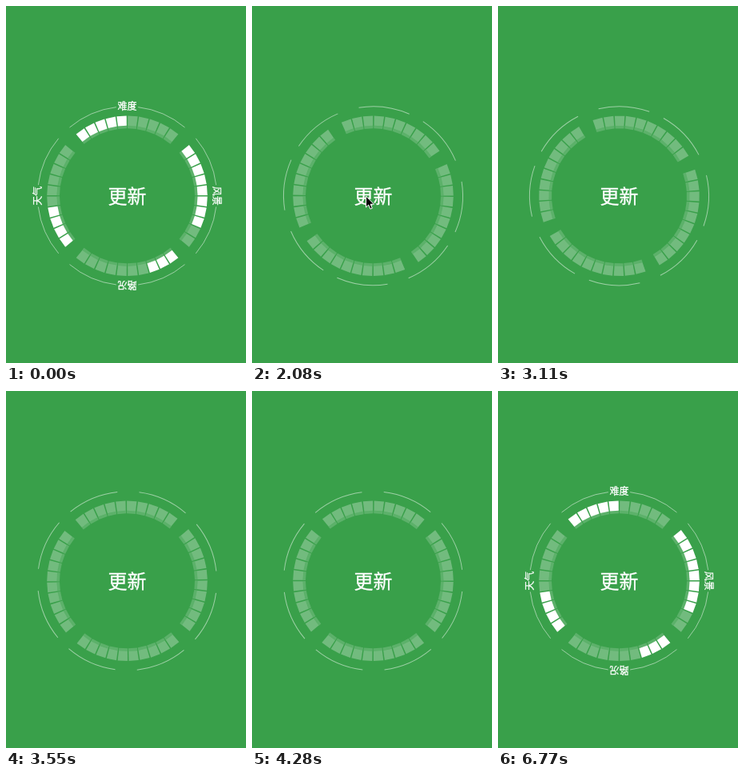
These frames come from a looping animation (300 by 447 pixels, 7890 ms). An HTML page:

```html
<!DOCTYPE html>
<html lang="zh-CN">
<head>
<meta charset="utf-8">
<title>更新</title>
<style>
  html, body { margin: 0; width: 100%; height: 100%; overflow: hidden; background: #39a04a; }
  svg { display: block; width: 300px; height: 447px; }
  text {
    fill: #fff; stroke: #fff; stroke-width: .3; text-anchor: middle;
    font-family: "Noto Sans CJK SC", "Noto Sans CJK", sans-serif;
  }
  .label { font-size: 12px; }
  .title { font-size: 24px; }
  .arc { fill: none; stroke: #fff; stroke-opacity: .5; }
  .cell { fill: #fff; fill-opacity: .29; }
  .cell.on { fill-opacity: 1; }
  .band { fill: #fff; fill-opacity: .18; }
</style>
</head>
<body>
<svg viewBox="0 0 300 447">
  <g transform="translate(151.5 237.8)">
    <g id="arcs"></g>
    <g id="cells"></g>
    <g id="labels"></g>
    <text class="title" y="9">更新</text>
  </g>
  <path id="cursor" d="M0 0V14L3.2 11L5.4 16.2L7.8 15.2L5.6 10.2H10Z" fill="#000" stroke="#fff"/>
</svg>
<script>
const LOOP = 7890, TICK = 147.1;
const SIDES = [['难度', 5], ['风景', 8], ['路况', 3], ['天气', 4]];
const FILL_TICKS = [32, 33, 35, 37, 39, 41, 43, 46];
const RESET = 10, SPIN_START = 8.95, SPIN_END = 29.25, TURN = 540;
const $ = id => document.getElementById(id);

function add(parent, tag, attrs, text) {
  const el = document.createElementNS('http://www.w3.org/2000/svg', tag);
  for (const name in attrs) el.setAttribute(name, attrs[name]);
  if (text) el.textContent = text;
  return parent.appendChild(el);
}

function polar(r, deg) {
  const a = deg * Math.PI / 180;
  return (r * Math.sin(a)).toFixed(2) + ' ' + (-r * Math.cos(a)).toFixed(2);
}

const arc = (r, a, b) => `M${polar(r, a)}A${r} ${r} 0 0 1 ${polar(r, b)}`;
const block = (r1, r2, a, b) =>
  `M${polar(r1, a)}L${polar(r2, a)}L${polar(r2, b)}L${polar(r1, b)}Z`;

const cells = SIDES.map(([name], side) => {
  const turn = side * 90;
  for (const a of [-40, 7]) add($('arcs'), 'path', { class: 'arc', d: arc(112, turn + a, turn + a + 33) });
  add($('labels'), 'text', { class: 'label', y: -107.5, transform: `rotate(${turn})` }, name);
  return Array.from({ length: 10 }, (_, i) => {
    const a = turn - 40 + i * 8;
    add($('cells'), 'path', { class: 'band', d: block(84.5, 88, a + .3, a + 7.7) });
    return add($('cells'), 'path', { class: 'cell', d: block(88, 100.3, a + .45, a + 7.55) });
  });
});

const clamp = x => Math.max(0, Math.min(1, x));
const ease = x => (1 - Math.cos(Math.PI * clamp(x))) / 2;

// Unwinds from -TURN to 0, so the sides end upright.
function spin(k) {
  if (k < RESET) return 0;
  const x = clamp((k - SPIN_START) / (SPIN_END - SPIN_START));
  return TURN * (ease(x - .011 * Math.sin(Math.PI * x)) - 1);
}

function cursorAt(k) {
  if (k < 2 || k > 18) return null;
  const p = ease((k - 2) / 4);
  const drop = 10 * Math.max(0, k - 14) ** 2;
  return [202.5 - 60 * p, 406 - 168 * p + drop];
}

function draw(now) {
  const k = Math.floor((now % LOOP + 4) / TICK);
  const angle = spin(k);
  $('arcs').setAttribute('transform', `rotate(${angle})`);
  $('cells').setAttribute('transform', `rotate(${-angle})`);
  $('labels').setAttribute('opacity', k < RESET ? 1 : clamp((k - 31) / 6));

  const filled = k < RESET ? 8 : FILL_TICKS.filter(t => k >= t).length;
  cells.forEach((row, side) => row.forEach((cell, i) =>
    cell.classList.toggle('on', i < Math.min(filled, SIDES[side][1]))));

  const at = cursorAt(k);
  $('cursor').setAttribute('visibility', at ? 'visible' : 'hidden');
  if (at) $('cursor').setAttribute('transform', `translate(${at})`);
}

const start = performance.now();
function loop() {
  draw(performance.now() - start);
  requestAnimationFrame(loop);
}
loop();
</script>
</body>
</html>
```
